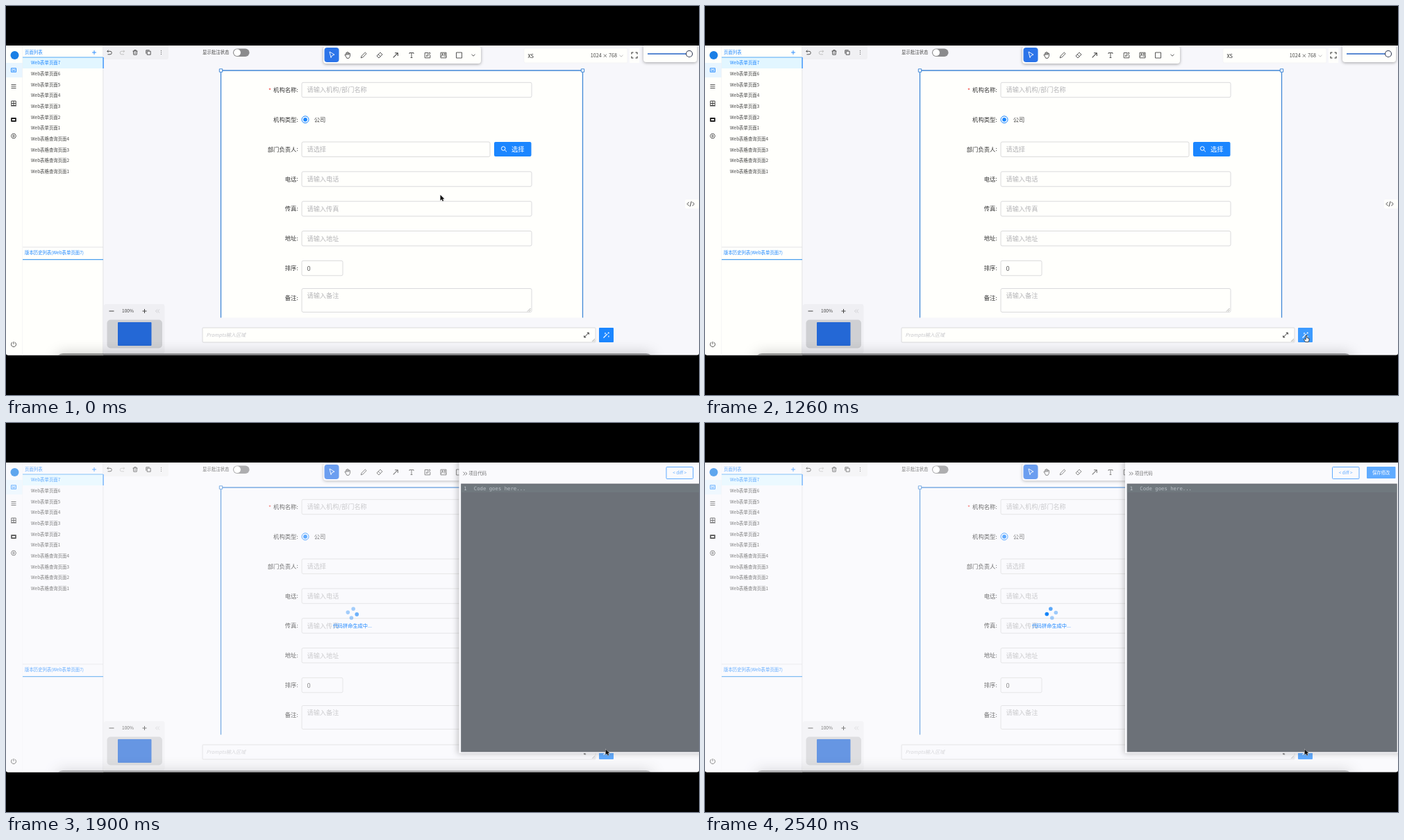
These frames come from a looping animation (998x561 px, 2.56 s). An HTML page with a canvas:

```html
<!DOCTYPE html>
<html lang="zh">
<head>
<meta charset="utf-8">
<style>
html, body { margin: 0; height: 100%; overflow: hidden; background: #000; }
canvas { display: block; width: 100vw; height: 100vh; }
</style>
</head>
<body>
<canvas id="stage" width="998" height="561"></canvas>
<script>
const ctx = document.getElementById('stage').getContext('2d');
const LOOP = 2560;
const SANS = '"Noto Sans CJK SC", "Noto Sans", sans-serif';
const MONO = '"DejaVu Sans Mono", monospace';
const BLUE = '#1b86ff', INK = '#444', HINT = '#b4b4b7', EDGE = '#dadadc';

const clamp = v => Math.max(0, Math.min(1, v));
const smooth = v => v * v * (3 - 2 * v);
const progress = (t, from, length) => clamp((t - from) / length);

// Timing curve cubic-bezier(.7, .3, .1, 1)
function drawerEase(p) {
  const curve = (a, b, s) => 3 * (1 - s) ** 2 * s * a + 3 * (1 - s) * s * s * b + s ** 3;
  let low = 0, high = 1;
  for (let i = 0; i < 20; i++) {
    const mid = (low + high) / 2;
    if (curve(.7, .1, mid) < p) low = mid; else high = mid;
  }
  return curve(.3, 1, low);
}

function box(x, y, w, h, fill, stroke, r = 0, lineWidth = 1) {
  ctx.beginPath();
  ctx.roundRect(x, y, w, h, r);
  if (fill) { ctx.fillStyle = fill; ctx.fill(); }
  ctx.shadowColor = 'transparent';
  if (stroke) { ctx.strokeStyle = stroke; ctx.lineWidth = lineWidth; ctx.stroke(); }
}

function shadow(color, blur, x = 0, y = 0) {
  ctx.shadowColor = color;
  ctx.shadowBlur = blur;
  ctx.shadowOffsetX = x;
  ctx.shadowOffsetY = y;
}

function disc(x, y, r, fill, stroke, lineWidth) {
  box(x - r, y - r, 2 * r, 2 * r, fill, stroke, r, lineWidth);
}

function text(str, x, y, size, color = INK, align = 'left', font = SANS, style = '') {
  ctx.font = `${style} ${size}px ${font}`;
  ctx.fillStyle = color;
  ctx.textAlign = align;
  ctx.textBaseline = 'alphabetic';
  ctx.fillText(str, x, y + size * .37);
}

function icon(x, y, d, color = INK, lineWidth = .9, fill) {
  const path = new Path2D(d);
  ctx.save();
  ctx.translate(x, y);
  if (fill) { ctx.fillStyle = fill; ctx.fill(path); }
  ctx.strokeStyle = color;
  ctx.lineWidth = lineWidth;
  ctx.lineJoin = 'round';
  if (lineWidth) ctx.stroke(path);
  ctx.restore();
}

const POINTER = 'M0 0V8L2 6.2L3.3 9L4.6 8.4L3.4 5.7H5.8Z';
const CHEVRON = 'M-2.5 -1.2L0 1.2L2.5 -1.2';
const PLUS = 'M-3 0H3M0 -3V3';

function drawSidebar(paper) {
  box(0, 57, 140, 447, paper);
  box(0, 82, 24, 21, '#e8f5ff');
  box(23.5, 57, .6, 447, '#efeff2');
  disc(12.5, 71, 6, '#1a7fe6');

  icon(11, 92.5, 'M-3.5 -2.7H3.5V2.7H-3.5ZM-2 -.8H-.5M.8 -.8H2.2M-2 1H2', BLUE);
  icon(11, 116, 'M-3.5 -2.5H3.5M-3.5 0H3.5M-3.5 2.5H3.5');
  icon(11, 140.5, 'M-3.2 -3.5H3.2V3H-3.2ZM-3.2 0H3.2M0 -3.5V3M-4 3.5H4', '#333');
  icon(11, 164, 'M-3 -2H3V2H-3Z', '#222', 1.8);
  icon(11, 187.5, 'M-1.8 -3.2H1.8L3.6 0L1.8 3.2H-1.8L-3.6 0ZM1.2 0A1.2 1.2 0 1 1 -1.2 0A1.2 1.2 0 1 1 1.2 0');
  icon(11, 488, 'M-1.8 -3A3.5 3.5 0 1 0 1.8 -3M0 -4V-.3');

  text('页面列表', 27, 66.5, 6.4, BLUE);
  icon(127, 67, PLUS, BLUE);
  box(24, 74, 116, 16, '#e2f6ff');
  box(24, 73.5, 116, 1, '#55a9f5');
  box(139.5, 57, .8, 447, '#dcdce0');
  box(139.5, 74, 1.2, 16, BLUE);
  for (let i = 0; i < 11; i++) {
    const name = i < 7 ? `表单页面${7 - i}` : `表格查询页面${11 - i}`;
    text('Web' + name, 36, 82 + i * 15.65, 6.4, i ? INK : BLUE);
  }
  box(24, 347.5, 116, .8, '#dcdce0');
  text('版本历史列表(Web表单页面7)', 27, 355.5, 6.4, BLUE);
  box(24, 365, 116, 1.2, '#4ba0ee');
}

function drawTopBar(paper) {
  box(141, 57, 93, 20, '#f0f0f3', null, [0, 0, 3, 0]);
  icon(149, 67, 'M-1.5 -3.4L-3.2 -1.7L-1.5 0M-3.2 -1.7H1A2.2 2.2 0 0 1 1 2.8H-2.5');
  icon(167.5, 67, 'M1.5 -3.4L3.2 -1.7L1.5 0M3.2 -1.7H-1A2.2 2.2 0 0 0 -1 2.8H2.5', '#bbb');
  icon(186, 67, 'M-3.4 -2H3.4M-1.3 -2V-3.3H1.3V-2M-2.6 -2L-2.2 3.2H2.2L2.6 -2M0 -.5V2', INK);
  icon(205, 67, 'M-1.8 -1.8H3.2V3.2H-1.8ZM-3.2 1.7V-3.2H1.7');
  for (const y of [64.3, 66.8, 69.3]) disc(223.5, y, .6, '#555');

  text('显示批注状态', 283, 67, 6.4);
  box(327, 61.5, 23.5, 11.5, '#8b8b8d', null, 6);
  disc(333, 67.2, 4.9, '#fff');

  shadow('rgba(0,0,0,.35)', 4, 0, 1);
  box(457, 58, 227, 25, paper, null, 4);
  box(458.5, 60, 21, 21, '#2b74e9', null, 4);
  icon(466, 66, 'M0 0L2 8.5L3.6 5.4L7 4.2Z', '#fff', .9);
  icon(492, 71, 'M-3 1L-4.2 -.5L-3.4 -1.2L-2.2 0V-3.4H-1V-4.4H.3V-3.8H1.8V-2.6H3.4V1.5L1.8 4.3H-1.2ZM-1 -3V-.5M.4 -3V-.5M1.8 -2.5V-.5');
  icon(515, 71, 'M-3.8 3.8L-3 1.2L2.3 -4L4 -2.3L-1.2 3Z');
  icon(538, 71, 'M-4 1L1 -4L4 -1L-1 4ZM-1.8 -1.2L1.2 1.8');
  icon(561, 71, 'M-3.3 3.3L3.3 -3.3M-1 -3.3H3.3V1', INK, 1.1);
  icon(584, 71, 'M-3 -2V-3.5H3V-2M0 -3.5V3.5M-1.4 3.5H1.4');
  icon(607, 71, 'M1 -3.5H-3.8V3.8H3.8V-.5M-1.5 1.5L-1 -.4L3 -4.2L4.2 -3L.3 1Z');
  icon(630, 71, 'M-4 -3.8H4V3.8H-4ZM-4 2L-1 -.5L1 1.5L2.2 .4L4 2.2M-2 -2.2H-.8V-1H-2ZM1.2 -2.2H2.5V-1H1.2Z');
  icon(652.5, 71, 'M-4 -4H4V4H-4Z');
  icon(673, 71, CHEVRON);

  box(746, 61, 149, 21, paper, '#f0f0f2', 2, .6);
  text('XS', 751.5, 71.8, 7.4, '#222', 'left', SANS, '500');
  text('1024 × 768', 880, 71.8, 7.2, INK, 'right');
  icon(886, 72, CHEVRON, '#aaa', .8);
  box(898, 61, 14, 21, paper);
  icon(905, 71, 'M-4 -1.5V-4H-1.5M1.5 -4H4V-1.5M4 1.5V4H1.5M-1.5 4H-4V1.5', '#333', 1.1);
  shadow('rgba(0,0,0,.35)', 4, 0, 1);
  box(918, 55, 77, 26, paper, null, 4);
  box(924, 68.3, 56, 1.5, '#2362c4');
  disc(984, 69, 4.5, '#fff', '#333d55', 1.1);
}

function drawForm(paper) {
  box(309.5, 93, 521, 356.5, paper);
  icon(309.5, 93, 'M0 356.5V0H521V356.5', '#4087d6', 1.3);
  for (const x of [309.5, 830.5]) box(x - 2.2, 90.8, 4.4, 4.4, '#fff', '#4087d6');

  const labels = ['机构名称', '机构类型', '部门负责人', '电话', '传真', '地址', '排序', '备注'];
  const hints = ['请输入机构/部门名称', , '请选择', '请输入电话', '请输入传真', '请输入地址', '0', '请输入备注'];
  labels.forEach((label, i) => {
    const y = 121 + i * 42.85;
    text(label, 418.3, y, 8.3, '#333', 'right');
    text(':', 420.8, y - .3, 8.3, '#333', 'right');
    if (!hints[i]) return;
    const width = i === 2 ? 271 : i === 6 ? 59 : 331;
    const tall = i === 7;
    box(426, tall ? 407.5 : y - 10.7, width, tall ? 34 : 21.4, paper, EDGE, 2);
    text(hints[i], 433.5, tall ? 418 : y, 9.2, i === 6 ? '#555' : HINT);
  });
  text('*', 378, 121.5, 8.5, '#f5403a');
  icon(754, 439, 'M-3 1.5L1.5 -3M-.5 1.5L1.5 -.5', '#888', .7);
  disc(431, 163.8, 5, paper, BLUE, 1);
  disc(431, 163.8, 2.9, BLUE);
  text('公司', 443.8, 163.8, 8.3);
  box(703, 196, 53.5, 21, BLUE, null, 2);
  icon(717, 205.5, 'M2 0A2.8 2.8 0 1 1 -3.6 0A2.8 2.8 0 1 1 2 0M1.2 2L4 4.8', '#fff', 1);
  text('选择', 728, 206.5, 9.2, '#fff');
}

function drawBottom(paper, hover) {
  box(141, 430, 87.5, 71, '#efeff3', null, 3);
  icon(152, 440, 'M-3.5 0H3.5', INK, 1);
  text('100%', 175.5, 440, 6.6, INK, 'center');
  icon(199.5, 440, PLUS, INK, 1);
  icon(218, 440, 'M0 -2.5L-2.5 0L0 2.5M3 -2.5L.5 0L3 2.5', '#c4c4c8', .8);
  box(145.5, 452.5, 79.5, 41, '#cfd0d3', null, 5);
  box(161, 456, 48.5, 34, '#2468d6', null, 1);

  box(283, 464, 566, 21, paper, EDGE, 1);
  text('Prompts输入区域', 288.5, 474.5, 7.1, '#c6c6ca', 'left', SANS, 'italic');
  icon(836, 474.5, 'M-3.3 3.3L3.3 -3.3M.8 -3.3H3.3V-.8M-.8 3.3H-3.3V.8', '#333', 1);
  icon(847, 483, 'M-3 1L1 -3M-.8 1L1 -.8', '#888', .7);
  box(854, 464, 21, 21, hover ? '#3d9bff' : BLUE, null, 1);
  icon(864.5, 474.5, 'M-4 4L1.6 -1.6M-1.5 -3.5V-1M3.4 1V3M3.2 -4V-2M2.2 -3H4.2', '#fff', 1.2);
  box(978, 279, 20, 13, paper, null, 2);
  icon(986, 285.5, 'M-2.4 -2.8L-5 0L-2.4 2.8M2.4 -2.8L5 0L2.4 2.8M1 -3.8L-1 3.8', '#333', .9);

  shadow('rgba(0,0,0,.42)', 20, 0, 0);
  box(72, 501, 860, 20, 'rgba(60,60,60,.5)', null, 10);
}

function drawDrawer(x, paper) {
  ctx.save();
  ctx.translate(x, 0);
  shadow('rgba(0,0,0,.3)', 8, -2, 1);
  box(0, 50, 400, 426, paper);
  icon(9, 73, 'M-3 -2.4L-.6 0L-3 2.4M0 -2.4L2.4 0L0 2.4', '#333', .9);
  text('项目代码', 14, 73, 6.4, '#333');
  box(298.5, 63.5, 38.5, 17, paper, BLUE, 1);
  text('< diff >', 317.7, 72, 6.4, BLUE, 'center');
  box(348, 63, 41.5, 17, BLUE, null, 1);
  text('保存修改', 368.7, 71.7, 6.4, '#fff', 'center', SANS, '500');
  box(2.7, 87.5, 389, 387, '#2c333d');
  box(2.7, 89.5, 389, 10.5, 'rgba(70,95,95,.25)');
  text('1', 9, 94.5, 7.3, '#a5abb5', 'center', MONO);
  text('Code goes here...', 21.3, 94.5, 7.3, '#9aa2ad', 'left', MONO);
  ctx.restore();
}

function drawSpinner(t, alpha) {
  const turn = (-33 + .249 * (t - 1720)) * Math.PI / 180;
  for (let i = 0; i < 4; i++) {
    const a = turn + i * Math.PI / 2;
    ctx.globalAlpha = alpha * (.38 + .62 * progress(t, 1500 + i * 500, 1050));
    disc(498.8 + 6.6 * Math.cos(a), 274.5 + 6.6 * Math.sin(a), 2.8, '#1684f8');
  }
  ctx.globalAlpha = alpha;
  text('代码拼命生成中...', 498.8, 292, 7.2, BLUE, 'center', SANS, '500');
  ctx.globalAlpha = 1;
}

// Time, x, y
const pointerPath = [
  [180, 625.5, 272.5], [540, 867, 405], [660, 901, 428], [760, 892, 434.5],
  [1180, 866, 475], [1440, 866, 475], [1560, 863.5, 470.5]
];

function pointerAt(t) {
  const next = pointerPath.findIndex(p => p[0] > t);
  if (next <= 0) return pointerPath.at(next).slice(1);
  const [a, b] = [pointerPath[next - 1], pointerPath[next]];
  const k = smooth(progress(t, a[0], b[0] - a[0]));
  return [a[1] + (b[1] - a[1]) * k, a[2] + (b[2] - a[2]) * k];
}

function draw(t) {
  const dim = progress(t, 1540, 140);
  const white = 255 - 8 * dim;
  const paper = `rgb(${white},${white},252)`;
  const slide = drawerEase(progress(t, 1674, 409));
  const [px, py] = pointerAt(t);
  const hover = t < 1540 && px < 875 && py > 464;

  box(0, 0, 998, 561, '#000');
  ctx.save();
  ctx.beginPath();
  ctx.roundRect(0, 57, 998, 446.5, [0, 0, 3, 3]);
  ctx.clip();
  box(0, 57, 998, 447, '#f7f7fb');
  drawSidebar(paper);
  drawTopBar(paper);
  drawForm(paper);
  drawBottom(paper, hover);
  if (slide > 0) drawDrawer(998 - 393 * slide, paper);
  box(0, 57, 998, 447, `rgba(255,255,255,${.3 * dim})`);
  if (dim > 0) drawSpinner(t, dim);
  ctx.restore();

  if (hover) {
    icon(px, py, 'M-.8 0H.8V3.5L4 4.5V7L3 9.5H-1.4L-3.6 6L-2.6 5L-.8 6.2Z', '#222', .8, '#fff');
  } else {
    icon(px, py, POINTER, '#fff', .8, '#111');
    icon(px, py, POINTER, '#111', 0, '#111');
  }
}

function tick(now) {
  draw(now % LOOP);
  requestAnimationFrame(tick);
}
requestAnimationFrame(tick);
</script>
</body>
</html>
```
